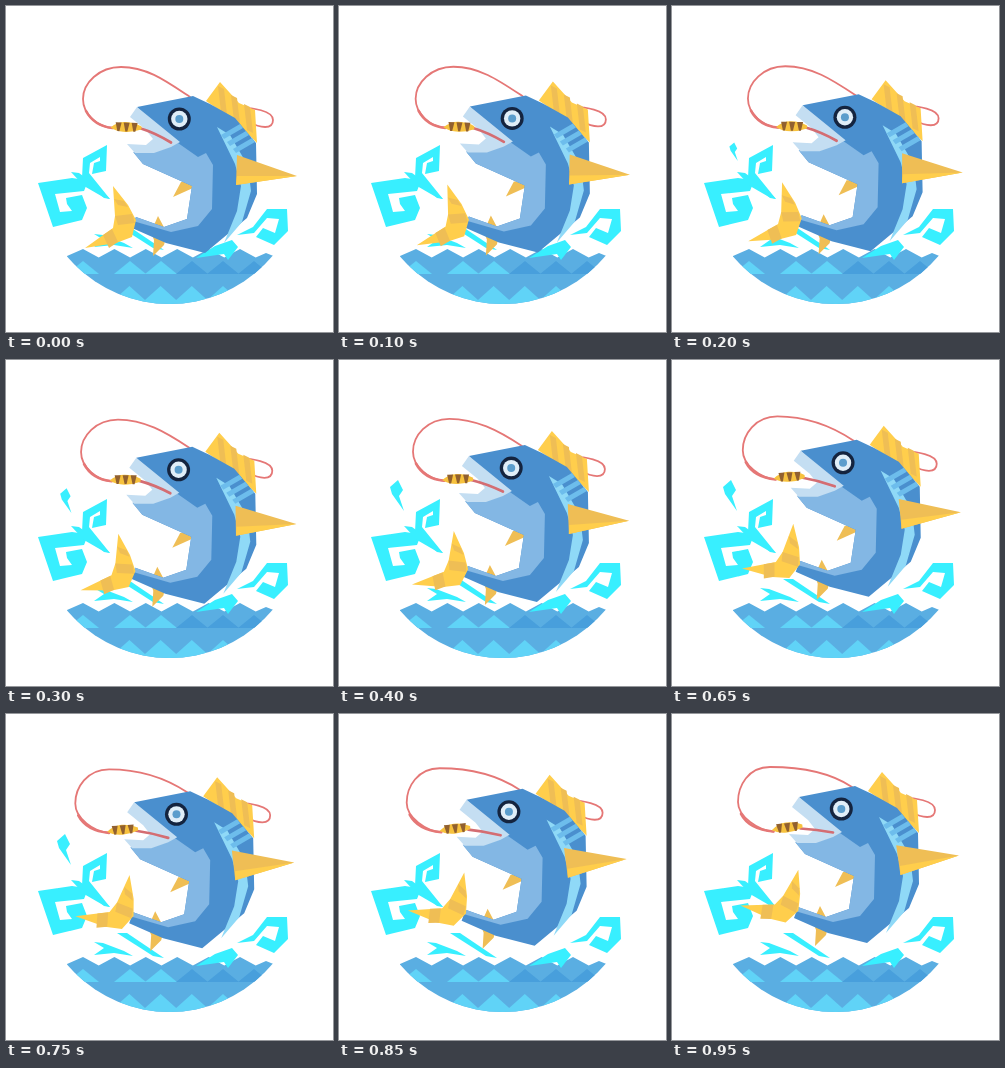
An HTML page for the animation above (1 s loop, 327 px wide and 326 px high).

```html
<!DOCTYPE html>
<html lang="en">
<head>
<meta charset="utf-8">
<title>Leaping fish</title>
<style>
html, body { margin: 0; width: 100%; height: 100%; overflow: hidden; background: #fff; }
svg { display: block; width: 100vw; height: 100vh; }
</style>
</head>
<body>
<svg id="stage" viewBox="0 0 327 326"></svg>
<script>
const NS = 'http://www.w3.org/2000/svg';
const stage = document.getElementById('stage');
const LOOP = 1000, STEP = 50;
const colors = {
  sea: '#5aaee2', deep: '#489fdc', foam: '#60d3f7', splash: '#38efff',
  blue: '#4a8fce', pale: '#83b7e4', lip: '#c4def2', shine: '#8fd9f7', stripe: '#6dbdec',
  gold: '#ffce4c', amber: '#efbe55', cord: '#e57776', tongue: '#d46d72'
};

function add(tag, attrs, parent = stage) {
  const el = document.createElementNS(NS, tag);
  for (const key in attrs) el.setAttribute(key, attrs[key]);
  parent.append(el);
  return el;
}
const group = (parent = stage) => add('g', {}, parent);
const poly = (color, points, parent) => add('polygon', { fill: colors[color], points }, parent);
const line = (color, width, parent) =>
  add('path', { fill: 'none', stroke: colors[color], 'stroke-width': width, 'stroke-linecap': 'round' }, parent);
// Parallelogram from a corner and two edge vectors
const slab = (color, x, y, ax, ay, bx, by, parent) =>
  poly(color, `${x},${y} ${x + ax},${y + ay} ${x + ax + bx},${y + ay + by} ${x + bx},${y + by}`, parent);
const zigzag = (x, y, half, depth, count) =>
  Array.from({ length: count }, (_, i) => `${x + i * half},${y + i % 2 * depth}`).join(' ');

// Sea: a bowl cut from a circle, topped with waves
const clip = add('clipPath', { id: 'bowl' });
add('circle', { cx: 163.5, cy: 163.5, r: 134.5 }, clip);
const water = add('g', { 'clip-path': 'url(#bowl)' });
poly('sea', `61,250 ${zigzag(77, 243, 15.7, 8.5, 12)} 260,247 270,251 270,300 55,300`, water);
const crest = (color, x) => poly(color, `${x - 16},268 ${x},255 ${x + 16},268`, water);
[77, 124, 155].forEach(x => crest('foam', x));
[186, 217, 248].forEach(x => crest('deep', x));
poly('foam', `${zigzag(61, 280, 15.6, 14, 14)} 270,300 55,300`, water);

// Splashes
[
  '32,177 66,172 73,173 80,180 78,185 49,188 54,206 66,205 61,198 60,192 76,189 81,202 76,214 47,221',
  '65,166 73,167 88,178 104,193 97,191 78,180',
  '77,152 101,139 100,165 86,168 88,157 94,155 94,151 84,157 83,167 104,193 98,192 76,172',
  '231,229 247,221 261,203 281,203 282,225 268,239 250,231 257,222 269,227 273,213 261,212 248,227',
  '88,228 97,229 118,237 127,242 108,239 88,241 98,234',
  '111,219 121,219 158,244 147,242',
  '190,252 209,240 226,234 232,241 222,254 218,248'
].forEach(points => poly('splash', points));
const drop = poly('splash', '-6,-10 2,-17 7,-7 3,-1 8,14 -4,-3');

// Fishing line
const cord = line('cord', 1.8), cordEnd = line('cord', 2.6);

// Fish
const fish = group();
add('path', { fill: 'none', stroke: colors.cord, 'stroke-width': 1.8,
  d: 'M228 102C248 101 267 105 267 114C267 124 254 122 243 116' }, fish);

poly('gold', '200,95 214,76 233,97 249,104 251,137 228,114', fish);
for (let i = 0; i < 3; i++) slab('amber', 212 + 13 * i, 80 + 9 * i, 6, 3, 3, 26, fish);
poly('amber', '167,191 175,176 187,176 187,182', fish);
poly('amber', '152,210 161,227 158,239 147,250 148,234 145,226', fish);

poly('blue', '131,101 187,90 204,98 229,112 250,137 251,188 241,212 199,247 160,237 126,222 130,211 158,221 181,213 186,180 137,158 128,147 172,137 150,122', fish);
poly('pale', '127,146 172,137 192,151 200,147 207,159 206,203 192,220 165,226 127,215 130,211 158,221 181,213 186,180 137,158', fish);
poly('shine', '211,121 224,129 242,160 245,185 236,216 218,237 231,205 235,180 229,158', fish);
for (let i = 0; i < 3; i++) slab('stripe', 215 + 6 * i, 129 + 7 * i, 19, -11, 3, 4, fish);
poly('lip', '124,111 131,101 174,136 165,141 148,147 129,147 121,138 140,139 147,133 140,124', fish);

const eye = add('g', { transform: 'translate(173.3 113)' }, fish);
[[11.5, '#14243f'], [8.2, '#e0eef8'], [4, '#5b9dcc']]
  .forEach(([r, fill]) => add('circle', { r, fill }, eye));

const tail = group(fish);
poly('gold', '107,180 122,199 130,214 126,231 110,237 79,242 107,222 109,210', tail);
slab('amber', 108, 193, 10, 2, 4, 6, tail);
slab('amber', 109, 210, 17, -2, 3, 9, tail);
slab('amber', 97, 229, 9, -6, 6, 13, tail);

const fin = group(fish);
poly('amber', '231,149 291,170 230,179', fin);
poly('gold', '231,170 291,170 230,179', fin);

// Lure and tongue
const tongue = line('tongue', 2.7);
const lure = group();
add('path', { fill: '#f7c23e', d: 'M-15 1Q-8 -5 0 -5Q9 -5 16 -1L16 2Q8 5 0 5Q-9 5 -15 1Z' }, lure);
[-7, 1, 9].forEach(x => add('path', { fill: '#91602f', d: `M${x - 3} -4.4H${x + 3}L${x + 1} 4.4H${x - 1}Z` }, lure));

function draw(ms) {
  const t = Math.floor(ms % LOOP / STEP) * STEP;
  const x = t / (LOOP - STEP);
  const p = x ** 1.5;
  const swing = (x + x * x * (3 - 2 * x)) / 2;

  const dx = -4 * p, dy = -18 * p;
  fish.setAttribute('transform', `translate(${dx} ${dy})`);
  tail.setAttribute('transform', `rotate(${34 * swing} 129 215)`);
  fin.setAttribute('transform', `rotate(${-10 * swing} 231 165)`);

  const lx = 119.5 - 5 * p, ly = 121 - 7.5 * p;
  lure.setAttribute('transform', `translate(${lx} ${ly}) rotate(${2 - 9 * p})`);
  tongue.setAttribute('d', `M${lx + 14} ${ly + 1}Q${lx + 30} ${ly + 6 - 4 * p} ${165 + dx} ${136.5 + dy}`);

  // The line runs from the head over its top and left edge to the lure.
  const hx = 184 + dx, hy = 91 + dy, tx = 115 - 17 * p, ty = 61 - 8 * p;
  const wx = 77 - 11 * p, wy = 93 - 5 * p, ex = lx - 13, ey = ly + 1 + 3 * p;
  cord.setAttribute('d', `M${hx} ${hy}C${hx - 24} ${hy - 16} ${tx + 26} ${ty} ${tx} ${ty}` +
    `C${tx - 22} ${ty} ${wx} ${wy - 16} ${wx} ${wy}C${wx} ${wy + 15} ${ex - 15} ${ey - 1} ${ex} ${ey}`);
  cordEnd.setAttribute('d', `M${wx + 3} ${wy + 12}Q${wx + 11} ${ey - 2} ${ex} ${ey}`);

  const rise = Math.max(0, Math.min(1, (t - 150) / 250));
  drop.setAttribute('transform', `translate(${62 - 5 * rise} ${149 - 12 * rise}) scale(${.5 + .5 * rise})`);
  drop.setAttribute('visibility', t >= 150 && t < 850 ? 'visible' : 'hidden');
}

const start = performance.now();
function tick() {
  draw(performance.now() - start);
  requestAnimationFrame(tick);
}
draw(0);
requestAnimationFrame(tick);
</script>
</body>
</html>
```
